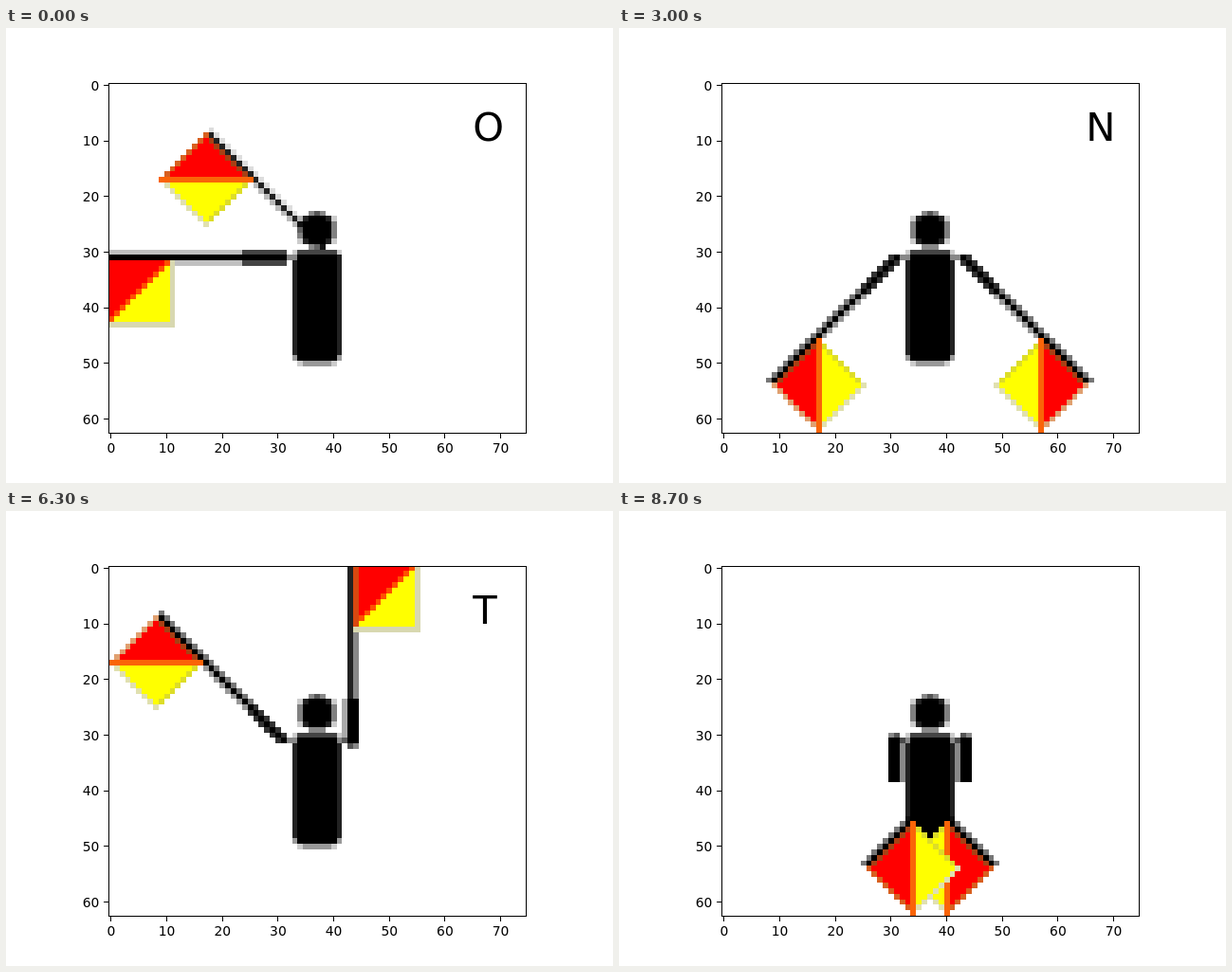
Animation of 640 by 480 pixels, one loop 9000 ms. Source, as an HTML page with a canvas:

```html
<!DOCTYPE html>
<html>
<head>
<meta charset="utf-8">
<style>
html, body { margin: 0; width: 100%; height: 100%; overflow: hidden; background: #fff; }
canvas { display: block; }
</style>
</head>
<body>
<canvas id="stage" width="640" height="480"></canvas>
<script>
const MESSAGE = 'OH CATHERINE   OH HEATHCLIFFE ';
const STEP = 300, COLS = 75, ROWS = 63, CELL = 369.6 / ROWS, LEFT = 108, TOP = 57.6;

// Left and right hand: 0-4 = down, low, level, high, up; a/c = crossing low/high; r = at rest.
const POSES = {
  A: '10', C: '30', E: '03', F: '02', H: '2a', I: '1c', L: '13',
  N: '11', O: '2c', R: '22', T: '34', ' ': 'rr'
};
const RED = '#f00', YELLOW = '#ff0';

const stage = document.getElementById('stage').getContext('2d');
const grid = document.createElement('canvas');
grid.width = COLS;
grid.height = ROWS;
const g = grid.getContext('2d');

function box(x, y, w, h, color) {
  g.fillStyle = color;
  g.fillRect(x, y, w, h);
}

function drawBody() {
  box(36, 23, 3, 1, '#888');
  box(37, 23, 1, 1, '#555');
  box(34, 24, 7, 5, '#ccc');
  box(34, 25, 7, 3, '#808080');
  box(35, 24, 5, 5, '#222');
  box(35, 25, 5, 3, '#000');
  box(36, 24, 3, 5, '#000');
  box(36, 29, 3, 1, '#888');
  box(33, 30, 9, 1, '#ccc');
  box(34, 30, 7, 1, '#444');
  box(33, 31, 9, 18, '#222');
  box(33, 49, 9, 1, '#999');
  box(34, 31, 7, 19, '#000');
  box(34, 50, 7, 1, '#ccc');
  box(35, 50, 5, 1, '#999');
}

// Plots cells around the shoulder, turned by quarter turns.
function plotter(right, turn, shift = 0) {
  return (x, y, color) => {
    const [u, v] = turn > 0 ? [-y, x] : turn < 0 ? [y, -x] : [x, y];
    const col = 31 + u + shift;
    box(right ? 74 - col : col, 31 + v, 1, 1, color);
  };
}

function straightArm(right, turn, handleOnly) {
  const put = plotter(right, turn);
  g.globalCompositeOperation = 'multiply';
  for (let k = turn ? -1 : 0; k <= (handleOnly ? 7 : 31); k++) {
    const handle = k < 8;
    if (!turn) {
      put(-k, 0, '#000');
      for (const y of [-1, 1]) put(-k, y, handle ? '#444' : '#c0c0c0');
    } else {
      put(-k, 0, k < 0 ? '#555' : handle ? '#000' : '#222');
      put(-k, turn, k < 0 || !handle ? '#888' : '#000');
      if (handle && k >= 0) put(-k, -turn, turn > 0 ? '#aaa' : '#888');
    }
  }
  g.globalCompositeOperation = 'source-over';
  if (handleOnly) return;
  for (let x = -31; x <= -20; x++) {
    for (let y = 1; y <= 12; y++) {
      const d = x + y + 20;
      let color = d < 0 ? RED : d ? YELLOW : '#ff5000';
      if (x === -20 || y === 12) color = '#d8d8b0';
      else if (turn > 0 && y === 1) color = '#d84810';
      put(x, y, color);
    }
  }
}

function slantedArm(right, turn, shift = 0) {
  const put = plotter(right, turn, shift);
  const crossing = shift === 8 || shift === 9;
  g.globalCompositeOperation = 'multiply';
  for (let k = shift === 17 ? 8 : crossing ? 2 : 0; k <= 22; k++) {
    const handle = !shift && k < 6;
    put(-k, k, crossing ? '#222' : '#000');
    put(-k - 1, k, handle ? '#333' : crossing ? '#ddd' : '#777');
    put(-k, k + 1, handle ? '#333' : crossing ? '#bbb' : '#999');
  }
  g.globalCompositeOperation = 'source-over';
  for (let u = -8; u <= 8; u++) {
    const reach = 8 - Math.abs(u);
    for (let v = -reach; v <= reach; v++) {
      let color = u < 0 ? RED : u ? YELLOW : shift === 8 ? RED : '#fa6408';
      if (Math.abs(v) === reach) {
        if (u < 0) color = v < 0 ? '#a84014' : shift ? '#d86020' : '#e0a070';
        else if (u) color = v < 0 ? '#dddd28' : '#e0e0b0';
      }
      put(u - 14, v + 23, color);
    }
  }
}

function drawArm(code, right) {
  if (code === 'a') return slantedArm(false, 0, 8);
  if (code === 'c') return slantedArm(false, 1, 9);
  box(right ? 41 : 32, 31, 2, 1, '#888');
  if (code === 'r') {
    straightArm(right, -1, true);
    slantedArm(right, 0, 17);
  } else if (code % 2) {
    slantedArm(right, code === '3' ? 1 : 0);
  } else {
    straightArm(right, code / 2 - 1);
  }
}

function drawAxes() {
  stage.strokeStyle = stage.fillStyle = '#000';
  stage.lineWidth = 1;
  stage.strokeRect(108.5, 58.5, 440, 369);
  stage.font = '13.89px "DejaVu Sans", sans-serif';
  for (let n = 0; n <= 70; n += 10) {
    const x = LEFT + (n + 0.5) * CELL, y = TOP + (n + 0.5) * CELL;
    stage.textAlign = 'center';
    stage.fillText(n, x, 448);
    stage.fillRect(Math.floor(x), 428, 1, 5);
    if (n > 60) continue;
    stage.textAlign = 'right';
    stage.fillText(n, 98.4, Math.round(y + 5));
    stage.fillRect(103, Math.floor(y), 5, 1);
  }
}

function draw(letter) {
  box(0, 0, COLS, ROWS, '#fff');
  drawBody();
  const [left, right] = POSES[letter];
  drawArm(right, true);
  drawArm(left, false);

  stage.fillStyle = '#fff';
  stage.fillRect(0, 0, 640, 480);
  stage.imageSmoothingEnabled = false;
  stage.drawImage(grid, LEFT, TOP, COLS * CELL, ROWS * CELL);
  drawAxes();
  stage.textAlign = 'left';
  stage.font = '41.67px "DejaVu Sans", sans-serif';
  stage.fillText(letter, LEFT + 65.5 * CELL, TOP + 10.5 * CELL);
}

let start, shown;
function tick(now) {
  start ??= now;
  const index = Math.floor(Math.max(0, now - start) / STEP) % MESSAGE.length;
  if (index !== shown) draw(MESSAGE[shown = index]);
  requestAnimationFrame(tick);
}
tick(performance.now());
</script>
</body>
</html>
```
